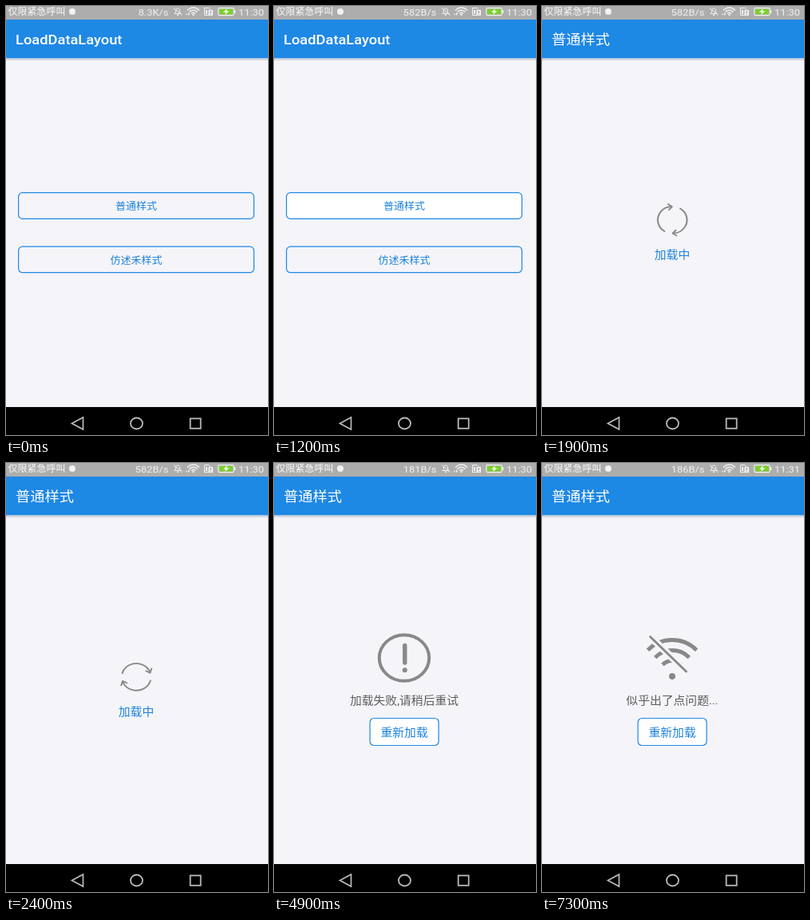
Write an HTML page with a canvas that moves like this. It is 328 px wide and 537 px high and loops after 8 s.

```html
<!DOCTYPE html>
<html lang="zh-CN">
<head>
<meta charset="utf-8">
<title>LoadDataLayout</title>
<style>
html, body { margin: 0; width: 100%; height: 100%; overflow: hidden; background: #f4f4f9; }
canvas { display: block; width: 328px; height: 537px; }
</style>
</head>
<body>
<canvas id="stage"></canvas>
<script>
const W = 328, H = 537, LOOP = 8000;
const SQUASH = 0.925; // the phone screen is shown slightly flattened
const BLUE = '#1e88e5', BG = '#f4f4f9', GRAY = '#888888', PALE = '#f2f2f2';
const FONT = 'Roboto, "Noto Sans CJK SC", "Noto Sans CJK", sans-serif';

const canvas = document.getElementById('stage');
const ctx = canvas.getContext('2d');
const dpr = window.devicePixelRatio || 1;
canvas.width = W * dpr;
canvas.height = H * dpr;

function text(str, x, y, size, color, align = 'center', weight = 400) {
  ctx.save();
  ctx.translate(x, y);
  ctx.scale(1, SQUASH);
  ctx.font = `${weight} ${size}px ${FONT}`;
  ctx.textAlign = align;
  ctx.fillStyle = color;
  ctx.fillText(str, 0, 0);
  ctx.restore();
}

function rect(x, y, w, h, color) {
  ctx.fillStyle = color;
  ctx.fillRect(x, y, w, h);
}

function path(points, closed) {
  ctx.beginPath();
  points.forEach(([x, y]) => ctx.lineTo(x, y));
  if (closed) ctx.closePath();
}

function stroke(color, width, cap = 'butt') {
  ctx.strokeStyle = color;
  ctx.lineWidth = width;
  ctx.lineCap = cap;
  ctx.stroke();
}

function dot(x, y, r, color) {
  ctx.beginPath();
  ctx.arc(x, y, r, 0, Math.PI * 2);
  ctx.fillStyle = color;
  ctx.fill();
}

function fan(x, y, r, half) {
  ctx.beginPath();
  ctx.arc(x, y, r, -Math.PI / 2 - half, -Math.PI / 2 + half);
}

function button(x, y, w, h, label, size, base, fill) {
  ctx.beginPath();
  ctx.roundRect(x, y, w, h, 5);
  ctx.fillStyle = fill;
  ctx.fill();
  stroke(BLUE, 1.2);
  text(label, x + w / 2, base, size, '#1a80dc');
}

function statusBar(t) {
  rect(0, 0, W, 17, '#adadad');
  text('仅限紧急呼叫', 2.5, 11.2, 12, '#fafafa', 'left');
  dot(83, 7, 4, PALE);

  const speed = t < 800 ? '8.3K/s' : t < 4900 ? '582B/s' : t < 6300 ? '181B/s' : '186B/s';
  text(speed, 203.3, 11.7, 12.8, PALE, 'right');

  // muted bell
  path([[211, 9.5], [212.5, 7.5], [212.5, 4.5], [215, 2.5], [217.5, 4.5], [217.5, 7.5], [219, 9.5]], true);
  stroke(PALE, 1);
  path([[210, 2.5], [220.5, 11.5]]);
  stroke(PALE, 1);
  dot(215, 11.3, 1, PALE);

  // wifi with activity marks
  [3, 6.3, 9.5].forEach(r => {
    fan(234.5, 11.5, r, 0.9);
    stroke(PALE, 1.5);
  });
  dot(234.5, 11, 1.2, PALE);
  dot(226, 10.3, 0.9, PALE);
  if (t < 6400 || t >= 7300) rect(228, 8.5, 1.6, 3, PALE);

  // sim card
  path([[248.5, 2.5], [254, 2.5], [256, 4.5], [256, 11.5], [248.5, 11.5]], true);
  stroke(PALE, 1);
  rect(250, 5, 2, 5, PALE);
  rect(253.5, 5, 5.5, 7, PALE);
  rect(255.7, 6, 1.2, 3, '#909090');
  rect(255.7, 10, 1.2, 1, '#909090');

  // battery
  ctx.beginPath();
  ctx.roundRect(265.8, 2.6, 19.4, 9, 1.5);
  stroke(PALE, 1.1);
  rect(267, 3.8, 17, 6.6, '#7bd02c');
  rect(285.7, 5, 1.6, 4, PALE);
  path([[277, 3.5], [272, 7.4], [275, 7.4], [274, 10.8], [279.5, 6.5], [276.2, 6.5]], true);
  ctx.fillStyle = '#ffffff';
  ctx.fill();

  text(t < 6600 ? '11:30' : '11:31', 291, 11.7, 12.8, PALE, 'left');
}

function toolbar(title, weight) {
  rect(0, 17, W, 48.5, BLUE);
  const shade = ctx.createLinearGradient(0, 65.5, 0, 69);
  shade.addColorStop(0, '#bcc3cc');
  shade.addColorStop(1, BG);
  rect(0, 65.5, W, 3.5, shade);
  text(title, 12, 48.4, 18.3, '#ffffff', 'left', weight);
}

function navBar() {
  const line = '#b9b9b9';
  rect(0, 502, W, 35, '#000000');
  path([[82.5, 522.5], [96.5, 515], [96.5, 530]], true);
  stroke(line, 1.7);
  ctx.beginPath();
  ctx.ellipse(163.5, 522.5, 7.5, 7, 0, 0, Math.PI * 2);
  stroke(line, 1.8);
  ctx.strokeRect(230.7, 516.4, 13, 12.4);
}

function menu(t) {
  const press = t < 1000 ? BG : t < 1200 ? '#fafafd' : '#ffffff';
  button(15.6, 233.6, 294.8, 32.8, '普通样式', 13, 255, press);
  button(15.6, 301.1, 294.8, 32.6, '仿述禾样式', 13, 322.6, BG);
}

function spinner(t) {
  const step = Math.min(15, Math.floor((t - 1500) / 100));
  const r = 18.3;
  ctx.save();
  ctx.translate(163.2, 267.8);
  ctx.scale(1, SQUASH);
  ctx.rotate((28 + step * 14.7) * Math.PI / 180);
  ctx.lineJoin = 'round';
  for (let i = 0; i < 2; i++) {
    ctx.beginPath();
    ctx.arc(0, 0, r, -2.52, 0);
    stroke(GRAY, 2, 'round');
    path([[r - 4.3, -3.6], [r - 0.3, 0.6], [r + 3.4, -4.2]]);
    stroke(GRAY, 1.9, 'round');
    ctx.rotate(Math.PI);
  }
  ctx.restore();
  text('加载中', 163, 316.4, 14.8, '#1a80dc');
}

function alertIcon() {
  ctx.beginPath();
  ctx.ellipse(163, 244, 31.2, 28.8, 0, 0, Math.PI * 2);
  stroke(GRAY, 4);
  path([[163.8, 228.5], [163.8, 250]]);
  stroke(GRAY, 5.4, 'round');
  dot(163.8, 259.2, 3, GRAY);
}

function offlineIcon() {
  [43, 30, 17].forEach(r => {
    fan(163, 264.5, r, 0.79);
    stroke(GRAY, 5);
  });
  dot(163, 267, 4, GRAY);
  path([[133, 215], [183, 263]]);
  stroke(BG, 9);
  path([[135.5, 217.5], [180.5, 261]]);
  stroke(GRAY, 2.8, 'round');
}

function failure(t) {
  const offline = t >= 6800;
  offline ? offlineIcon() : alertIcon();
  text(offline ? '似乎出了点问题...' : '加载失败,请稍后重试', 163, 302.3, 14.8, '#5c5c5c');
  button(120.1, 319.5, 86, 34, '重新加载', 14.8, 342.3, '#ffffff');
}

function draw(t) {
  ctx.setTransform(dpr, 0, 0, dpr, 0, 0);
  rect(0, 0, W, H, BG);
  statusBar(t);
  if (t < 1500) {
    toolbar('LoadDataLayout', 500);
    menu(t);
  } else {
    toolbar('普通样式', 400);
    t < 4900 ? spinner(t) : failure(t);
  }
  navBar();
}

const start = performance.now();
function tick() {
  draw((performance.now() - start) % LOOP);
  requestAnimationFrame(tick);
}
tick();
</script>
</body>
</html>
```
